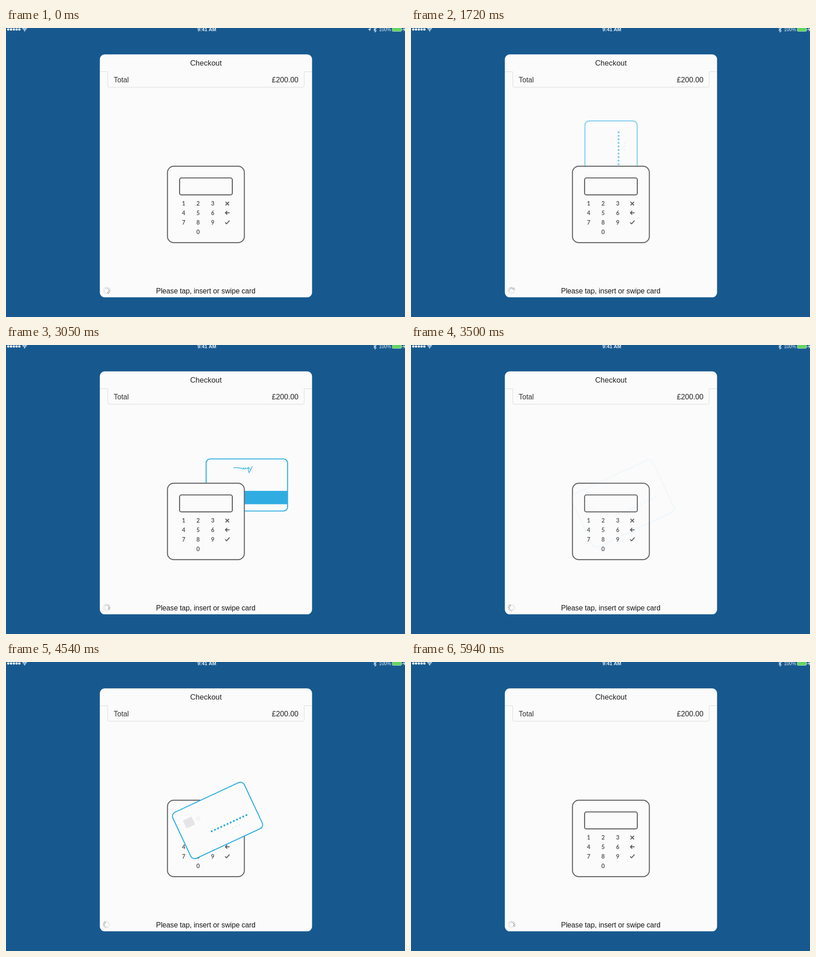
Recreate the animation shown at these times as an HTML page with a canvas. Size 878 by 638 pixels, loop 6040 ms.

```html
<!DOCTYPE html>
<html lang="en">
<head>
<meta charset="utf-8">
<title>Checkout</title>
<style>
  html, body { margin: 0; width: 100%; height: 100%; overflow: hidden; background: #17598f; }
  canvas { display: block; }
</style>
</head>
<body>
<canvas id="stage" width="878" height="638"></canvas>
<script>
const ctx = document.getElementById('stage').getContext('2d');
const TAU = Math.PI * 2;
const LOOP = 6040;
const PAPER = '#fbfbfb', INK = '#5b5c5f', BLUE = '#2fade2', PALE = '#e5e5e8';
const SANS = '"Liberation Sans", Arial, sans-serif';

// Picture rate: [end of span in ms, number of even holds inside it]
const SPANS = [[90, 1], [1020, 7], [1140, 1], [1720, 4], [2160, 3], [2310, 1], [2460, 1],
  [3350, 6], [3500, 1], [4100, 4], [4540, 3], [4630, 1], [5400, 6], [5640, 2],
  [5790, 1], [5940, 1], [LOOP, 1]];

function heldTime(time) {
  let start = 0;
  for (const [end, holds] of SPANS) {
    if (time < end) {
      const hold = (end - start) / holds;
      return start + Math.floor((time - start) / hold) * hold;
    }
    start = end;
  }
  return 0;
}

const clamp = v => Math.max(0, Math.min(1, v));
const ramp = (t, a, b) => clamp((t - a) / (b - a));
const ease = (t, a, b) => { const p = ramp(t, a, b); return p * p * (3 - 2 * p); };
const mix = (a, b, p) => a + (b - a) * p;
const fade = (t, inA, inB, outA, outB) => ramp(t, inA, inB) * (1 - ramp(t, outA, outB));

function roundBox(x, y, w, h, r, fill, stroke, width) {
  ctx.beginPath();
  ctx.roundRect(x, y, w, h, r);
  if (fill) { ctx.fillStyle = fill; ctx.fill(); }
  if (stroke) { ctx.strokeStyle = stroke; ctx.lineWidth = width; ctx.stroke(); }
}

function disc(x, y, r, color) {
  ctx.fillStyle = color;
  ctx.beginPath();
  ctx.arc(x, y, r, 0, TAU);
  ctx.fill();
}

function line(color, width, ...points) {
  ctx.strokeStyle = color;
  ctx.lineWidth = width;
  ctx.beginPath();
  points.forEach(([x, y]) => ctx.lineTo(x, y));
  ctx.stroke();
}

function polygon(color, ...points) {
  ctx.fillStyle = color;
  ctx.beginPath();
  points.forEach(([x, y]) => ctx.lineTo(x, y));
  ctx.fill();
}

function text(str, x, y, font, color, align = 'left') {
  ctx.font = font;
  ctx.fillStyle = color;
  ctx.textAlign = align;
  ctx.fillText(str, x, y);
}

function layer(alpha, x, y, angle, scale, draw) {
  if (alpha <= 0) return;
  ctx.save();
  ctx.globalAlpha = alpha;
  ctx.translate(x, y);
  ctx.rotate(angle);
  ctx.scale(scale, scale);
  draw();
  ctx.restore();
}

function drawStatusBar(t) {
  for (let i = 0; i < 5; i++) disc(5 + i * 6.1, 3.2, 2.5, '#fff');
  ctx.strokeStyle = '#fff';
  ctx.lineWidth = 1.5;
  for (const r of [3.7, 6.4]) {
    ctx.beginPath();
    ctx.arc(41, 6.6, r, -Math.PI * 0.77, -Math.PI * 0.23);
    ctx.stroke();
  }
  disc(41, 6, 1.3, '#fff');
  text('9:41 AM', 442, 7, `bold 10.8px ${SANS}`, '#e9f0f6', 'center');
  if (t < 90) polygon('#e9f0f6', [803.5, 0], [796, 3.6], [799.6, 4], [800, 7.6]);
  line('#e9f0f6', 1.1, [808.8, 1.2], [814.8, 6.2], [811.8, 9], [811.8, -1.5], [814.8, 1.2], [808.8, 6.2]);
  text('100%', 834, 7, `10.4px ${SANS}`, '#e9f0f6', 'center');
  roundBox(850, -0.5, 20, 8, 1.5, '#62d65f', '#cfe3dc', 0.8);
  roundBox(871, 2, 1.4, 3.4, 0.7, '#cfe3dc');
  polygon('#fff', [877, -1], [873.4, 4], [876, 4], [875, 8], [879, 3], [876.4, 3]);
}

function drawPanel() {
  roundBox(206.5, 58.3, 467, 536.3, 11, PAPER);
  ctx.strokeStyle = '#d9d9da';
  ctx.lineWidth = 1;
  ctx.beginPath();
  ctx.moveTo(207, 96.5);
  ctx.lineTo(223.8, 96.5);
  ctx.arcTo(223.8, 130.8, 230, 130.8, 4);
  ctx.arcTo(656.2, 130.8, 656.2, 120, 4);
  ctx.lineTo(656.2, 96.5);
  ctx.lineTo(673, 96.5);
  ctx.stroke();
  text('Checkout', 440, 83, `16.5px ${SANS}`, '#222', 'center');
  text('Total', 237, 119.6, `15.8px ${SANS}`, '#333');
  text('£200.00', 643.5, 119.6, `16.2px ${SANS}`, '#222', 'right');
  text('Please tap, insert or swipe card', 439.6, 585.5, `15.7px ${SANS}`, '#161616', 'center');
}

function drawSpinner(t) {
  const head = Math.floor((0.45 + t / 1000) * 12);
  ctx.lineCap = 'round';
  for (let i = 0; i < 12; i++) {
    const age = (((head - i) % 12) + 12) % 12;
    const angle = i / 12 * TAU - Math.PI / 2;
    const c = Math.cos(angle), s = Math.sin(angle);
    const shade = Math.round(mix(135, 226, clamp(age / 7)));
    line(`rgb(${shade},${shade},${shade})`, 1.4,
      [221.3 + c * 4.6, 579.8 + s * 4.6], [221.3 + c * 7.8, 579.8 + s * 7.8]);
  }
}

function drawReader() {
  roundBox(355.3, 305.1, 169.2, 168.8, 14, PAPER, '#626366', 2.2);
  roundBox(382, 331, 116, 37.4, 4, null, INK, 2.2);
  const columns = [391, 422.7, 454.8];
  const rows = [387.7, 408.3, 429];
  const font = 'bold 12.6px Lato, sans-serif';
  for (let n = 0; n < 9; n++) {
    text(String(n + 1), columns[n % 3], rows[Math.floor(n / 3)] + 4.5, font, '#55565a', 'center');
  }
  text('0', columns[1], 455, font, '#55565a', 'center');
  ctx.lineCap = 'butt';
  line(INK, 2, [483, 383.7], [490.8, 391.5]);
  line(INK, 2, [490.8, 383.7], [483, 391.5]);
  line(INK, 2, [483, 408], [492, 408]);
  line(INK, 2, [486.8, 404], [482.8, 408], [486.8, 412]);
  line(INK, 2, [482.2, 429.2], [485.4, 432.4], [491.8, 425]);
}

function drawCardFront() {
  roundBox(-99, -63.9, 198, 127.8, 11, PAPER, BLUE, 2.5);
  roundBox(-79, -36.5, 24, 22, 2, PALE);
  ctx.strokeStyle = PALE;
  ctx.lineWidth = 1.1;
  for (const r of [4, 8, 12]) {
    ctx.beginPath();
    ctx.arc(-50, -25.4, r, -0.75, 0.75);
    ctx.stroke();
  }
  for (let i = 0; i < 12; i++) disc(-24.6 + i * 8.72, 18.5, 2.45, BLUE);
  for (let i = 0; i < 3; i++) disc(27.4 + i * 8.6, 33.5, 1.6, PALE);
}

function drawCardBack() {
  roundBox(-89.6, -57.5, 179.2, 115, 9, PAPER, BLUE, 2.2);
  ctx.fillStyle = BLUE;
  ctx.fillRect(-90, 13, 180, 29.5);
  ctx.strokeStyle = BLUE;
  ctx.lineWidth = 1.4;
  ctx.lineJoin = 'round';
  ctx.beginPath();
  ctx.moveTo(-29, -38);
  ctx.bezierCurveTo(-22, -39, -15, -37, -11, -37);
  ctx.quadraticCurveTo(-8, -33, -7, -38);
  ctx.quadraticCurveTo(-4, -32, -3, -38);
  ctx.quadraticCurveTo(1, -34, 3, -39);
  ctx.quadraticCurveTo(3, -30, 5, -27);
  ctx.lineTo(12, -41);
  ctx.moveTo(3, -39);
  ctx.quadraticCurveTo(6, -37, 8, -33);
  ctx.stroke();
  ctx.lineJoin = 'miter';
}

function drawInsert(t) {
  const y = mix(224, 294.2, ease(t, 500, 1250));
  layer(fade(t, 90, 420, 1590, 1900), 440.2, y, -Math.PI / 2, 0.9, drawCardFront);
}

function drawSwipe(t) {
  const x = mix(350, 530, ease(t, 2130, 2810));
  layer(fade(t, 1900, 2200, 2950, 3300), x, 309, 0, 1, drawCardBack);
}

function drawTap(t) {
  for (let i = 0; i < 4; i++) {
    const glow = 0.55 * fade(t, 4800 + i * 110, 4920 + i * 110, 5500, 5780);
    layer(glow, 389.8 + i * 33.4, 465.8, 0, 1, () => disc(0, 0, 3.1, '#2f9fee'));
  }
  const scale = mix(1, 0.818, ease(t, 4200, 4750));
  layer(fade(t, 3485, 3785, 5480, 5780), 465.5, 349.8, -25 * Math.PI / 180, scale, drawCardFront);
}

function render(now) {
  const t = heldTime(now % LOOP);
  ctx.fillStyle = '#17598f';
  ctx.fillRect(0, 0, 878, 638);
  drawStatusBar(t);
  drawPanel();
  drawSpinner(t);
  drawInsert(t);
  drawSwipe(t);
  drawReader();
  drawTap(t);
}

let origin;
function tick(now) {
  origin ??= now;
  render(now - origin);
  requestAnimationFrame(tick);
}
render(0);
requestAnimationFrame(tick);
</script>
</body>
</html>
```
